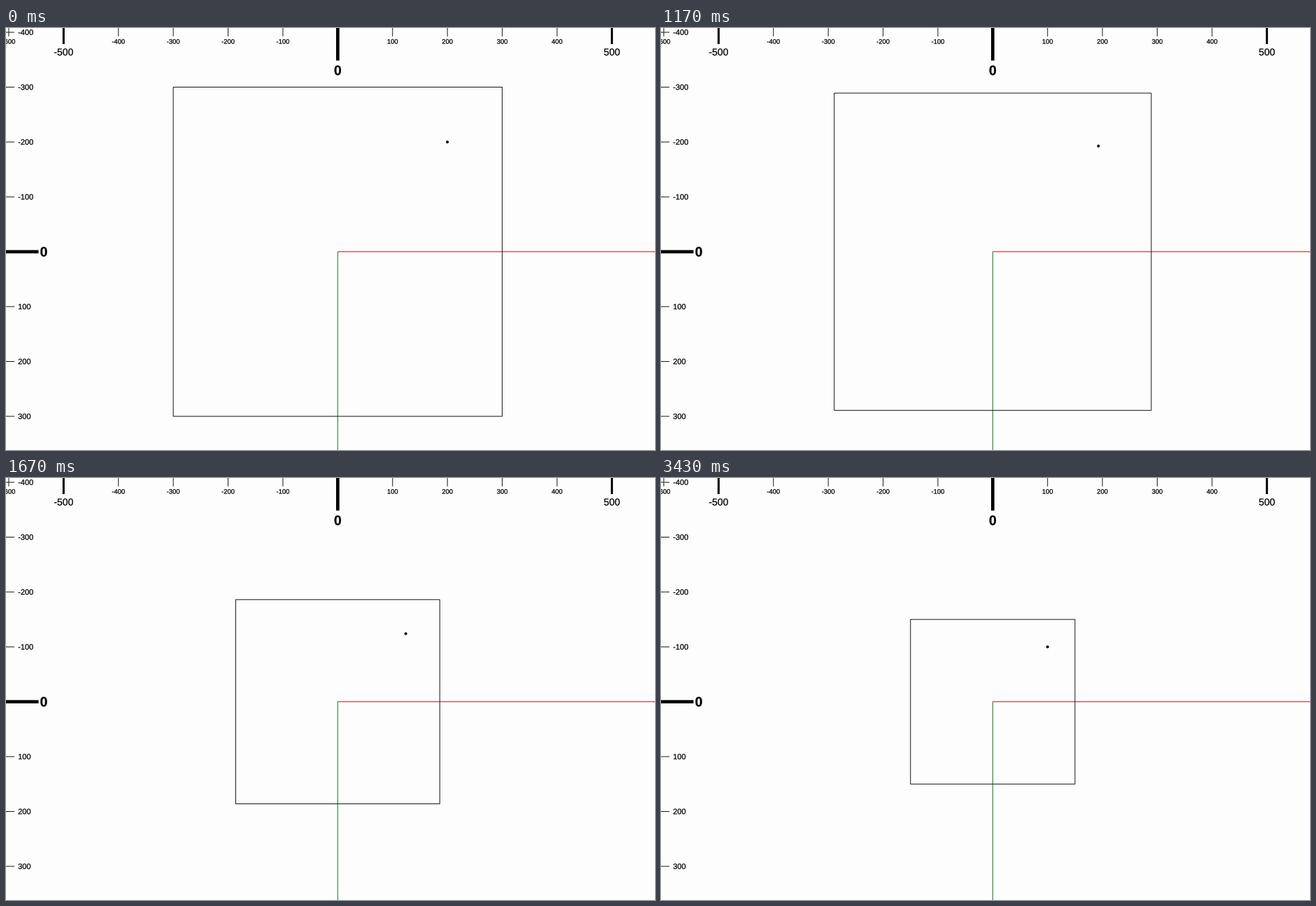
A matplotlib script that plays this animation: 928x603 px, repeating every 3460 ms.

```python
import math
import matplotlib.pyplot as plt
from matplotlib.animation import FuncAnimation
from matplotlib.patches import Circle, PathPatch
from matplotlib.textpath import TextPath
from matplotlib.transforms import Affine2D

W, H, DPI = 928, 603, 64
PT = 72 / DPI               # points per pixel
CX, CY, UNIT = 474.35, 319.7, 0.784
STEP_MS, LOOP_MS = 10, 3460

fig = plt.figure(figsize=(W / DPI, H / DPI), dpi=DPI, facecolor="#fdfdfd")
ax = fig.add_axes([0, 0, 1, 1])
ax.set_xlim(0, W)
ax.set_ylim(H, 0)
ax.axis("off")


def line(xs, ys, color, width=1, z=2):
    return ax.plot(xs, ys, color=color, lw=width * PT, zorder=z, snap=False,
                   solid_capstyle="butt", solid_joinstyle="miter")[0]


def label(x, y, value, size, center=True, weight="normal"):
    """Outlined text, vertically centred on y, slightly thickened."""
    text = str(value)
    path = TextPath((0, 0), text, size=size,
                    prop={"family": "Liberation Sans", "weight": weight})
    if center:
        x -= size * sum(0.333 if c == "-" else 0.556 for c in text) / 2
    box = path.get_extents()
    place = Affine2D().scale(1, -1).translate(x, y + (box.y0 + box.y1) / 2)
    ax.add_patch(PathPatch(place.transform_path(path), fc="black", ec="black",
                           lw=0.25 * PT, snap=False, zorder=2))


def tick_style(value):
    """Tick length, tick width and colour."""
    if value == 0:
        return 46.5, 4.7, "black"
    if value % 500 == 0:
        return 23, 3, "black"
    return 12, 1, "#181818"


def top_ruler():
    for value in range(-600, 501, 100):
        x = CX + value * UNIT
        length, width, color = tick_style(value)
        line([x, x], [0, length], color, width)
        if value == 0:
            label(x, 60.5, value, 19.5, weight="bold")
        elif value % 500 == 0:
            label(x, 34.3, value, 14)
        else:
            label(x, 19.3, value, 9.4)


def left_ruler():
    for value in range(-400, 301, 100):
        y = CY + value * UNIT
        length, width, color = tick_style(value)
        line([0, length], [y, y], color, width)
        if value == 0:
            label(54, y, value, 19.5, weight="bold")
        else:
            label(17.2, y, value, 11, center=False)


top_ruler()
left_ruler()
line([CX, W], [CY, CY], "#c81414")
line([CX, CX], [CY, H], "#127a22")

box = line([], [], "#141414", z=3)
dot = Circle((0, 0), 2, color="black", lw=0, zorder=4)
ax.add_patch(dot)


def zoom(ms):
    u = min(max((ms - 993) / 1000, 0), 1)
    return 1 - 0.5 * (1 - math.cos(math.pi * u)) / 2


def update(n):
    tick = math.floor((n + 0.5) * 0.3)      # picture changes at 30 fps
    k = zoom(tick * 100 / 3) * UNIT
    left, right = CX - 300 * k, CX + 300 * k
    top, bottom = CY - 300 * k, CY + 300 * k
    box.set_data([left, right, right, left, left],
                 [top, top, bottom, bottom, top])
    dot.center = (CX + 200 * k, CY - 200 * k)
    return box, dot


anim = FuncAnimation(fig, update, frames=LOOP_MS // STEP_MS,
                     interval=STEP_MS, repeat=True, repeat_delay=0)
plt.show()
```
